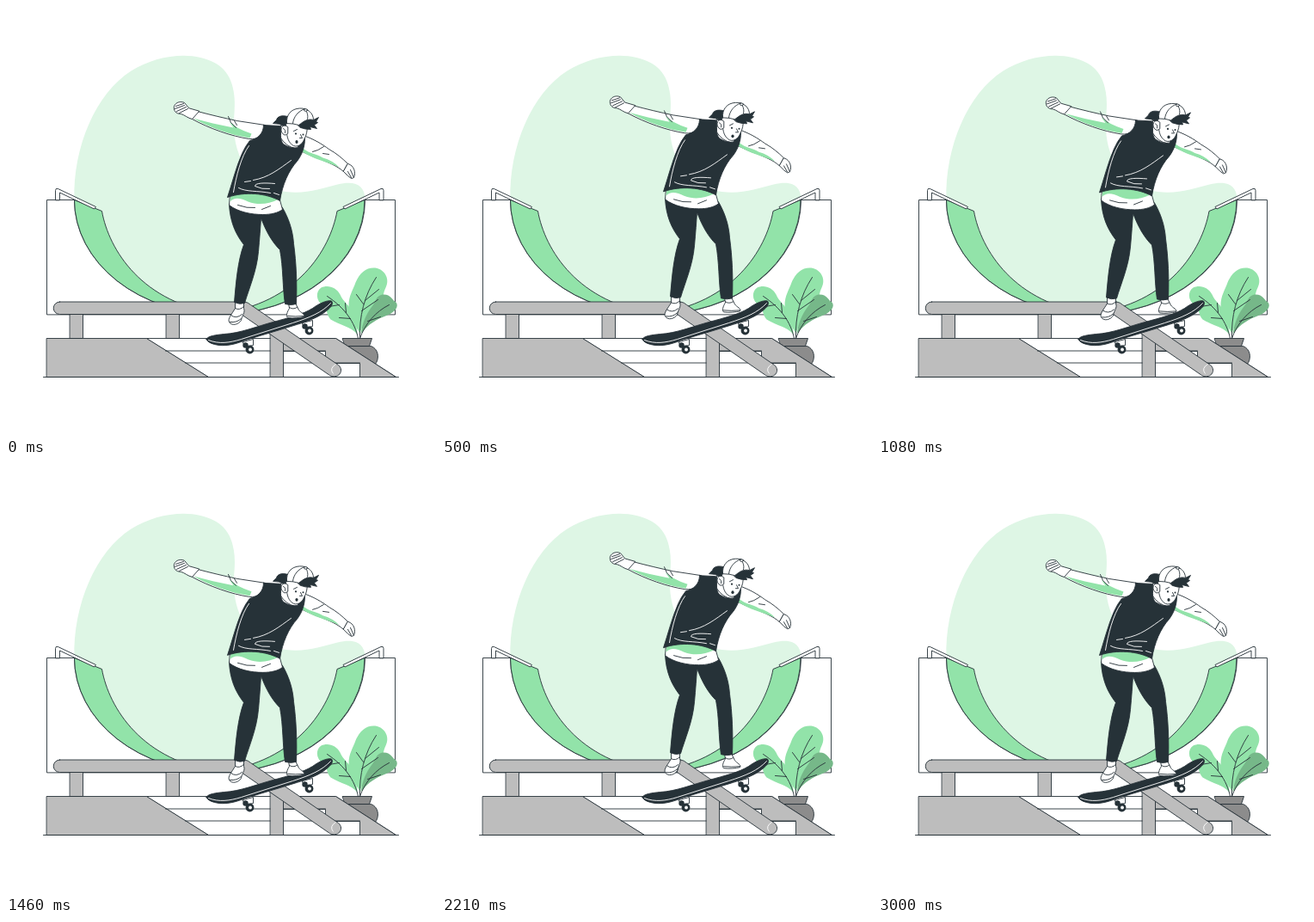
An HTML page that plays this animation: 500x500 px, repeating every 3.04 s.

```html
<!DOCTYPE html>
<html lang="en">
<head>
<meta charset="utf-8">
<title>Skater</title>
<style>
html, body { margin: 0; width: 100%; height: 100%; overflow: hidden; background: #fff; }
svg { display: block; width: 100vw; height: 100vh; }
.o { stroke: #263238; stroke-width: .9; stroke-linejoin: round; stroke-linecap: round; }
.n { fill: none; }
.w { fill: #fff; }
.g { fill: #92e3a9; }
.d { fill: #263238; }
.gray { fill: #bdbdbd; }
.pot { fill: #8c8c8c; }
.seam { fill: none; stroke: #fff; stroke-width: .9; stroke-linecap: round; }
</style>
</head>
<body>
<svg viewBox="0 0 500 500">
  <defs>
    <g id="ramp">
      <path class="g o" d="M79 225L111 238C119 283 158 346 248 357V358A169 133 0 0 1 79 225Z"/>
      <path class="w o" d="M57 225V214Q57 211 60 212L104 233L102 235.500L62 216.500V225Z"/>
    </g>
    <g id="truck">
      <path class="w o" d="M-8-9L4-12L4-5L-5-3Z"/>
      <circle class="d" cx="-5" cy="-5" r="3.200"/>
      <circle class="d" r="4.900"/>
      <circle cx=".5" r="1.900" fill="#fff"/>
    </g>
  </defs>

  <g transform="translate(.5 .5)">
    <path fill="#def6e5" d="M79 225C77 164 104 101 145 75C175 56 217 51 243 66C263 77 267 101 265 124C261 164 275 199 313 213C342 221 364 212 385 207C406 202 417 208 417 225A169 133 0 0 1 79 225Z"/>

    <!-- half pipe -->
    <path class="w o" d="M47 358V225H79A169 133 0 0 0 417 225H452V358Z"/>
    <use href="#ramp"/>
    <use href="#ramp" transform="translate(495.500) scale(-1 1)"/>

    <!-- plant -->
    <path class="g" d="M408 381C400 372 388 371 377 364C372 359 374 353 368 348C360 342 359 332 366 327C374 323 384 327 388 335C391 343 399 347 402 356C405 366 408 374 408 381Z"/>
    <path class="g" d="M411 380C404 368 398 360 398 348C398 336 403 330 406 321C411 309 419 303 429 304C441 306 446 318 441 327C438 333 439 338 433 345C424 355 416 366 411 380Z"/>
    <path fill="#76b889" d="M412 381C414 368 418 358 425 349C430 343 429 337 437 335C447 334 448 341 453 344C457 349 451 356 443 359C430 364 421 369 412 381Z"/>
    <path class="n o" d="M409 386C405 367 394 351 373 337M411 386C410 361 416 336 430 315M411 386C417 369 429 355 445 347M395 356L394 345M387 347L375 349M400 363L387 362M415 346L407 335M417 342L433 329M413 354L432 341M420 366L435 361"/>
    <path class="pot o" d="M394 395H424C434 399 434 412 427 418L400 425C390 416 389 404 394 395Z"/>
    <path class="pot o" d="M391 386H425L422 395H394Z"/>

    <!-- steps -->
    <path class="w o" d="M163 386H383L453 431H235Z"/>
    <path class="gray o" d="M47 386H163L235 431H47Z"/>
    <path class="gray o" d="M322 386H383L453 431H411V415H371V401H322Z"/>
    <path class="n o" d="M185 400.500H371M208 414.500H411M43 431H456"/>

    <!-- grind rail -->
    <path class="gray o" d="M74 358H89V386H74ZM186 358H201V386H186ZM307 370H322V431H307Z"/>
    <path class="gray o" d="M62 343.500H277L273 358H62A7 7 0 0 1 62 343.500Z"/>
    <path class="gray o" d="M277 343.500Q281 344 284 347L386 417C394 424 385 434 376 429L273 358Z"/>
    <path class="n" d="M380 427Q375 421 383 416" stroke="#fff" stroke-width=".9"/>

    <!-- board -->
    <use href="#truck" x="283" y="399"/>
    <use href="#truck" x="352" y="377"/>
    <path class="d o" d="M232.500 387C234 383 244 382 253 381C272 380 291 372 310 367C328 362 345 358 356 351C364 345 374 341 378 342.500C382 347 373 354 365 359C353 366 337 370 318 376L278 388C266 393 254 396 242 393Q234 391 232.500 387Z"/>
    <path class="seam" d="M235 388C247 393 260 391 273 387L333 368C352 362 367 356 377 345"/>

    <g id="skater">
      <!-- legs and shoes -->
      <path class="w o" d="M266 344V351C262 358 257 363 259 367C262 372 270 370 273 365C274 359 278 356 276 351V344Z"/>
      <path class="n o" d="M266 351Q271 354 276 349M261 359Q267 364 274 358M260 367Q268 368 273 363"/>
      <path class="w o" d="M328 345L329 351C326 356 325 360 327 362C334 363 341 362 346 361C348 358 342 356 340 353L336 345Z"/>
      <path class="n o" d="M329 350Q333 353 338 350M327 360Q336 361 346 360"/>
      <path class="d o" d="M259 230C260 250 266 264 276 277C269 296 267 320 265 344Q271 347 277 345C282 328 291 308 293 285Q295 262 296 246C302 262 309 274 318 283C322 304 321 326 324 346Q331 348 337 346C338 323 337 298 334 276C333 260 328 246 321 234Z"/>
      <path class="w o" d="M260 218L259 231C269 239 285 242 298 242C308 242 316 240 321 236L316 218Z"/>
      <path class="g" d="M261 217L260 227C265 221 273 223 281 227C294 232 306 229 315 225V217Z"/>
      <path class="n o" d="M269 231Q280 235 289 234M297 236L307 232"/>

      <!-- arms -->
      <path class="w o" d="M222 122C237 126 254 130 268 133L301 138C301 150 293 155 282 154C262 151 236 142 216 131Z"/>
      <path class="g" d="M217 130C232 134 248 138 264 141L259 134Q267 142 285 148L283 153C262 150 236 141 217 130Z"/>
      <path class="n o" d="M258 128L261 135L267 141M265 133L268 138"/>
      <path class="w o" d="M224 122L216 131C211 130 207 126 203 125C197 125 194 121 195 116C197 111 203 110 207 112L212 118Z"/>
      <path class="n o" d="M197 116L206 113M196 119L207 115M198 122L209 117M201 124L211 119"/>
      <path class="w o" d="M345 150C357 154 367 160 375 166C384 171 391 177 397 183L392 192C384 185 375 182 366 178C356 175 349 171 342 168Z"/>
      <path class="g" d="M345 165C353 172 361 171 368 176Q379 179 387 187C373 181 356 177 344 169Z"/>
      <path class="n o" d="M369 163Q362 168 356 169M375 172L368 171"/>
      <path class="w o" d="M397 183C402 184 405 189 405 194Q405 200 401 200L397 197L392 192Z"/>
      <path class="n o" d="M397 192L401 199M400 190L404 199"/>

      <!-- shirt -->
      <path class="d o" d="M299 138L318 139L340 157L347 153C347 163 344 172 338 180C328 191 321 207 318 226C302 217 277 215 257 222C262 207 267 187 274 171Q278 162 283 156C292 154 299 148 299 138Z"/>
      <path class="seam" stroke-width="1.200" d="M282 162C273 174 267 198 264 216"/>
      <path class="seam" d="M277 204L284 203M287 202C305 199 317 189 331 179M270 211C279 216 292 214 307 217M311 217L317 219M312 206C300 205 289 205 289 209Q297 213 306 212"/>

      <!-- head -->
      <path class="d o" d="M327 128C320 126 315 128 314 132L310 136Q318 136 322 139L329 137Z"/>
      <path class="w o" d="M319 139C320 147 317 154 322 160Q331 166 339 164L340 158L333 139Z"/>
      <path class="w o" d="M326 135C324 138 325 142 326 145C326 152 328 159 334 162C339 164 344 160 346 155C349 150 350 144 350 137L341 131Z"/>
      <path class="w o" d="M327 140C322 136 318 141 320 146Q323 152 327 148Z"/>
      <path class="n o" d="M322 142Q325 143 324 147M334 145L338 143M342 149L344 153L341 153"/>
      <circle class="d" cx="336.500" cy="148" r="1.100"/>
      <circle class="d" cx="345" cy="149" r="1"/>
      <ellipse class="d" cx="337.500" cy="157.500" rx="1.600" ry="1.900"/>
      <path class="d o" d="M339 138C344 133 351 130 357 132L363 129L360 134L362 135L358 138L361 142L353 140L354 143Q347 143 342 141Z"/>
      <path class="w o" d="M326 136C325 126 331 119 341 118.500C350 118 357 124 357 132C350 130 345 134 340 138Q334 136 326 136Z"/>
      <path class="n o" d="M347 119C350 123 351 127 350 131M347 119C339 122 334 128 333 136"/>
      <ellipse class="w o" cx="348" cy="120.500" rx="2" ry="1.300"/>
      <path class="n o" stroke-width="1.800" d="M319 153Q325 163 336 165"/>
    </g>
  </g>
</svg>
<script>
const skater = document.getElementById('skater');
const PERIOD = 1520, LIFT = 9;

function draw(now) {
  const y = -LIFT * (1 - Math.cos(2 * Math.PI * now / PERIOD)) / 2;
  skater.setAttribute('transform', `translate(0 ${y.toFixed(3)})`);
  requestAnimationFrame(draw);
}
draw(performance.now());
</script>
</body>
</html>
```
